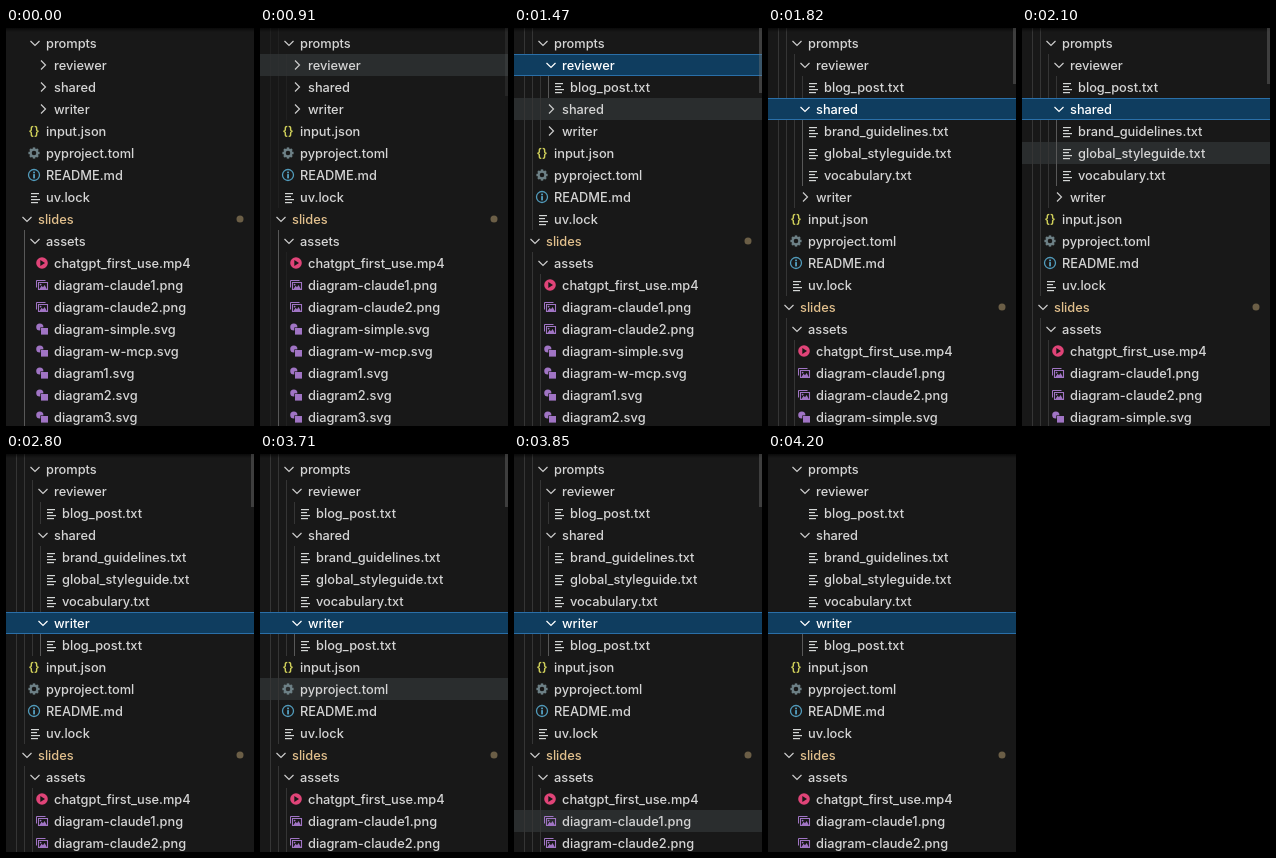
An HTML page with a canvas for the animation above (4.27 s loop, 248 by 398 pixels).

```html
<!DOCTYPE html>
<html lang="en">
<head>
<meta charset="utf-8">
<title>File tree</title>
<style>
html, body { margin: 0; width: 100%; height: 100%; overflow: hidden; background: #181818; }
canvas { display: block; width: 248px; height: 398px; }
</style>
</head>
<body>
<canvas id="stage"></canvas>
<script>
const W = 248, H = 398, ROW = 22, TOP = 4, LOOP = 4270;
const canvas = document.getElementById('stage');
const ctx = canvas.getContext('2d');
const ratio = window.devicePixelRatio || 1;
canvas.width = W * ratio;
canvas.height = H * ratio;

const PURPLE = '#a074c4', LIGHT = '#d4d7d6', PANEL = '#181818';
const FOCUS = '#0f3d5f', FOCUS_EDGE = '#2a6fa8';

// Entries: [depth, name, kind, folder that must be open]
const tree = [
  [1, 'prompts', 'open'],
  [2, 'reviewer', 'dir'],
  [3, 'blog_post.txt', 'txt', 'reviewer'],
  [2, 'shared', 'dir'],
  [3, 'brand_guidelines.txt', 'txt', 'shared'],
  [3, 'global_styleguide.txt', 'txt', 'shared'],
  [3, 'vocabulary.txt', 'txt', 'shared'],
  [2, 'writer', 'dir'],
  [3, 'blog_post.txt', 'txt', 'writer'],
  [1, 'input.json', 'json'],
  [1, 'pyproject.toml', 'gear'],
  [1, 'README.md', 'info'],
  [1, 'uv.lock', 'txt'],
  [0, 'slides', 'open'],
  [1, 'assets', 'open'],
  [2, 'chatgpt_first_use.mp4', 'video'],
  [2, 'diagram-claude1.png', 'image'],
  [2, 'diagram-claude2.png', 'image'],
  [2, 'diagram-simple.svg', 'svg'],
  [2, 'diagram-w-mcp.svg', 'svg'],
  [2, 'diagram1.svg', 'svg'],
  [2, 'diagram2.svg', 'svg'],
  [2, 'diagram3.svg', 'svg']
].map(([depth, name, kind, parent]) => ({ depth, name, kind, parent }));

const slidesAt = tree.findIndex(row => row.name === 'slides');
const alwaysShown = tree.filter(row => !row.parent).length;
const folderOpens = { reviewer: 980, shared: 1820, writer: 2800 };

// Pointer path: [time, hovered row]
const hovers = [
  [0, -1], [910, 1], [1400, 2], [1470, 3], [1960, 4], [2100, 5], [2240, 6],
  [2380, 7], [3710, 10], [3780, 13], [3850, 16], [3990, 17], [4130, -1]
];

// Opacity of indent guides and scrollbar: [time, alpha]
const fades = [[0, 0], [910, 0.35], [980, 1], [4130, 0.4], [4200, 0]];

const valueAt = (steps, t) => steps.filter(s => s[0] <= t).pop()[1];

function fill(color, x, y, w, h) {
  ctx.fillStyle = color;
  ctx.fillRect(x, y, w, h);
}

function disc(color, x, y, r) {
  ctx.fillStyle = color;
  ctx.beginPath();
  ctx.arc(x, y, r, 0, Math.PI * 2);
  ctx.fill();
}

function ring(color, width, x, y, r) {
  ctx.strokeStyle = color;
  ctx.lineWidth = width;
  ctx.beginPath();
  ctx.arc(x, y, r, 0, Math.PI * 2);
  ctx.stroke();
}

function line(color, width, ...points) {
  ctx.strokeStyle = color;
  ctx.lineWidth = width;
  ctx.beginPath();
  points.forEach(([x, y]) => ctx.lineTo(x, y));
  ctx.stroke();
}

function shape(color, ...points) {
  ctx.fillStyle = color;
  ctx.beginPath();
  points.forEach(([x, y]) => ctx.lineTo(x, y));
  ctx.fill();
}

function chevron(x, y, open, color) {
  if (open) line(color, 1.2, [x - 4.5, y - 2], [x, y + 2.5], [x + 4.5, y - 2]);
  else line(color, 1.2, [x - 2, y - 4.5], [x + 2.5, y], [x - 2, y + 4.5]);
}

const icons = {
  txt(x, y) {
    [8, 6, 9, 7].forEach((w, i) => fill(LIGHT, x - 3, y - 4 + i * 3, w, 1.2));
  },
  json(x, y) {
    ctx.fillStyle = '#d0d05a';
    ctx.font = '600 12px Inter, sans-serif';
    ctx.textAlign = 'center';
    ctx.fillText('{}', x, y + 4);
    ctx.textAlign = 'left';
  },
  gear(x, y) {
    for (let i = 0; i < 8; i++) {
      const a = i * Math.PI / 4, dx = Math.cos(a), dy = Math.sin(a);
      line('#6d8086', 2.4, [x + dx * 3, y + dy * 3], [x + dx * 5.6, y + dy * 5.6]);
    }
    ring('#6d8086', 2.2, x, y, 3.4);
  },
  info(x, y) {
    ring('#519aba', 1.3, x, y, 5.5);
    fill('#519aba', x - 0.9, y - 3.4, 1.9, 1.7);
    fill('#519aba', x - 0.9, y - 0.9, 1.9, 4.3);
  },
  video(x, y) {
    disc('#e04478', x, y, 5.8);
    shape(PANEL, [x - 1.7, y - 3], [x + 3, y], [x - 1.7, y + 3]);
  },
  image(x, y) {
    line(PURPLE, 1, [x + 3.5, y - 4.5], [x - 5.5, y - 4.5], [x - 5.5, y + 2.5]);
    line(PURPLE, 1.1, [x - 3.5, y - 2.5], [x + 5.5, y - 2.5], [x + 5.5, y + 4.5],
      [x - 3.5, y + 4.5], [x - 3.5, y - 3]);
    shape(PURPLE, [x - 2.6, y + 4], [x - 0.4, y + 0.8], [x + 1, y + 2.2],
      [x + 2.6, y], [x + 4.8, y + 4]);
    disc(PURPLE, x - 1.4, y - 0.4, 0.9);
  },
  svg(x, y) {
    disc(PURPLE, x - 2.2, y - 2, 3.6);
    fill(PANEL, x - 1.7, y - 1.6, 8, 7.4);
    fill(PURPLE, x - 1, y - 1, 7, 6.6);
  }
};

function drawGuides(row, y, fade, focused) {
  for (let level = -1; level < row.depth; level++) {
    const active = focused
      ? level === row.depth - 1 && row.parent === focused
      : level === 0 && row.inSlides;
    ctx.globalAlpha = active ? 1 : fade;
    fill(active ? '#585858' : '#353535', 18 + level * 8, y, 1, ROW);
  }
  ctx.globalAlpha = 1;
}

function drawRow(row, y, { t, fade, focused, hovered }) {
  const isFocused = row.name === focused;
  if (isFocused) {
    fill(FOCUS_EDGE, 0, y, W, ROW);
    fill(FOCUS, 0, y + 1, W, ROW - 2);
  } else {
    if (hovered) fill('#2a2d2e', 0, y, W, ROW);
    drawGuides(row, y, fade, focused);
  }

  const textX = 32 + row.depth * 8, mid = y + ROW / 2;
  if (icons[row.kind]) icons[row.kind](textX - 12, mid);
  else chevron(textX - 11, mid, row.kind === 'open' || t >= folderOpens[row.name],
    isFocused ? '#ffffff' : '#cccccc');

  ctx.font = '500 12.8px Inter, sans-serif';
  ctx.fillStyle = isFocused ? '#ffffff' : row.name === 'slides' ? '#e2c08d' : '#d4d4d4';
  ctx.fillText(row.name, textX, y + 16);
  if (row.name === 'slides') disc('#6b5e46', 234, mid, 3.5);
}

function draw(t) {
  ctx.setTransform(ratio, 0, 0, ratio, 0, 0);
  fill(PANEL, 0, 0, W, H);

  const fade = valueAt(fades, t);
  const hoverRow = valueAt(hovers, t);
  const focused = Object.keys(folderOpens).filter(name => t >= folderOpens[name]).pop();
  const rows = tree
    .map((row, i) => ({ ...row, inSlides: i > slidesAt }))
    .filter(row => !row.parent || t >= folderOpens[row.parent]);

  ctx.globalAlpha = fade;
  for (const x of [10, 18]) fill('#353535', x, 0, 1, TOP);
  ctx.globalAlpha = 1;
  rows.forEach((row, i) => {
    const y = TOP + i * ROW;
    if (y < H) drawRow(row, y, { t, fade, focused, hovered: i === hoverRow });
  });

  const shadow = ctx.createLinearGradient(0, 0, 0, 4);
  shadow.addColorStop(0, 'rgba(0,0,0,.6)');
  shadow.addColorStop(1, 'rgba(0,0,0,0)');
  fill(shadow, 0, 0, W, 4);

  // The thumb shrinks as folders open.
  ctx.globalAlpha = fade;
  fill('rgba(121,121,121,.4)', 245, 0, 3, 68 - (rows.length - alwaysShown) * 3);
  ctx.globalAlpha = 1;
}

function tick() {
  draw(performance.now() % LOOP);
  requestAnimationFrame(tick);
}
tick();
</script>
</body>
</html>
```
